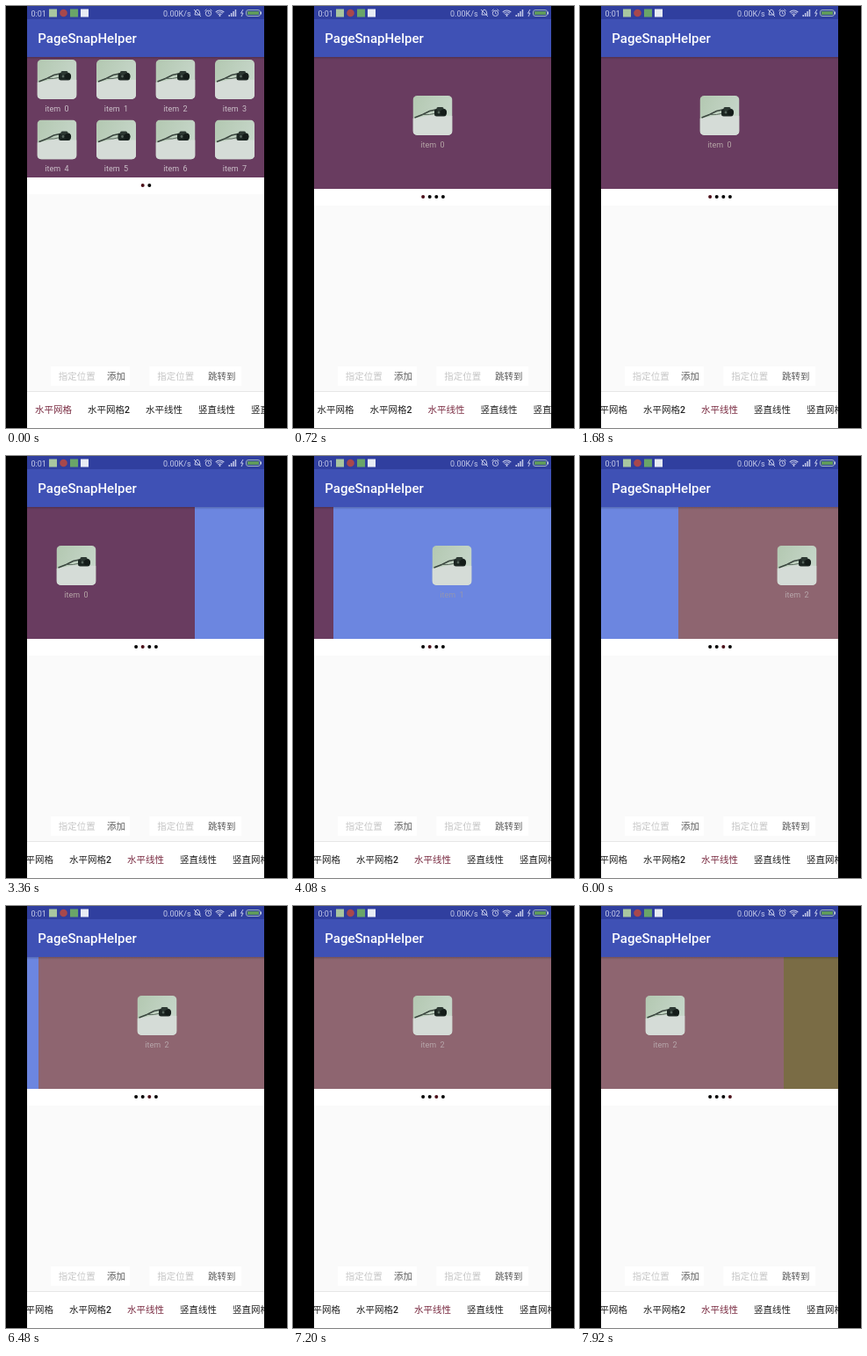
Recreate the animation shown at these times as an HTML page with a canvas. Size 320 by 480 pixels, loop 8 s.

```html
<!DOCTYPE html>
<html lang="zh">
<head>
<meta charset="utf-8">
<title>PageSnapHelper</title>
<style>
html, body { margin: 0; width: 100%; height: 100%; overflow: hidden; background: #000; }
canvas { display: block; width: 320px; height: 480px; }
</style>
</head>
<body>
<canvas id="stage"></canvas>
<script>
const LOOP = 8000, STEP = 240;
const LEFT = 24, WIDTH = 270, TOP = 58;
const SWITCH_AT = 720, CLOCK_AT = 7440;
const PAGES = ['#693c60', '#6c86e0', '#8e6570', '#7a6c45'];
const LABELS = ['#b5a5a6', '#9496b0', '#b7a6aa', '#b8b09a'];
const ACTIVE = '#7a2c42';
const SNAP = [0, 21, 100, 182, 226, 257, 266, 270];
const SWIPES = [{ at: 3360, lead: 1.74 }, { at: 5520, lead: 1 }, { at: 7920, lead: 1.52 }];
const TABS = [['水平网格', 33], ['水平网格2', 93], ['水平线性', 159], ['竖直线性', 219], ['竖直网格', 279]];
const FONT = 'Roboto, "Noto Sans CJK SC", "Noto Sans CJK", sans-serif';

const canvas = document.getElementById('stage');
const dpr = window.devicePixelRatio || 1;
canvas.width = 320 * dpr;
canvas.height = 480 * dpr;
const c = canvas.getContext('2d');
c.scale(dpr, dpr);

function rect(x, y, w, h, color) {
  c.fillStyle = color;
  c.fillRect(x, y, w, h);
}

function rounded(x, y, w, h, r, color) {
  c.fillStyle = color;
  c.beginPath();
  c.roundRect(x, y, w, h, r);
  c.fill();
}

function circle(x, y, r, color) {
  c.fillStyle = color;
  c.beginPath();
  c.arc(x, y, r, 0, Math.PI * 2);
  c.fill();
}

function line(points, color, width = 1) {
  c.strokeStyle = color;
  c.lineWidth = width;
  c.beginPath();
  points.forEach(([x, y]) => c.lineTo(x, y));
  c.stroke();
}

function text(str, x, y, size, color, weight = 400, align = 'left') {
  c.font = `${weight} ${size}px ${FONT}`;
  c.textAlign = align;
  c.fillStyle = color;
  c.fillText(str, x, y);
}

function clipped(x, y, w, h, r, draw) {
  c.save();
  c.beginPath();
  c.roundRect(x, y, w, h, r);
  c.clip();
  draw();
  c.restore();
}

// Still life: dark camera with its strap on a white table.
function photo(x, y) {
  c.save();
  c.translate(x, y);
  clipped(0, 0, 45, 45, 5, () => {
    const wall = c.createLinearGradient(0, 0, 45, 20);
    wall.addColorStop(0, '#b3c8b1');
    wall.addColorStop(1, '#c6d6c9');
    rect(0, 0, 45, 45, wall);
    c.fillStyle = '#d5dcd7';
    c.beginPath();
    c.moveTo(0, 26);
    c.lineTo(20, 22);
    c.lineTo(45, 23);
    c.lineTo(45, 45);
    c.lineTo(0, 45);
    c.fill();
    line([[2, 25], [11, 21.5], [19, 17.5], [26, 16]], '#38443d', 1.4);
    line([[11, 21.5], [19, 21.5], [26, 20]], '#55625a', 0.9);
    rounded(24.5, 15, 13.5, 8.5, 2.5, '#1c2622');
    rounded(27, 13, 8, 4, 1.5, '#2c3832');
    circle(35, 19, 3.6, '#141c19');
    circle(29.5, 19, 1.4, '#56655d');
  });
  c.restore();
}

function item(n, cx, y, color) {
  photo(cx - 22.5, y);
  text('item  ' + n, cx, y + 58.5, 9, color, 400, 'center');
}

function dots(count, active, y) {
  rect(LEFT, y - 9, WIDTH, 19, '#fff');
  for (let i = 0; i < count; i++) {
    circle(159.5 + (i - (count - 1) / 2) * 7.6, y, 2, i === active ? '#4c101a' : '#050505');
  }
}

function grid() {
  rect(LEFT, TOP, WIDTH, 137, PAGES[0]);
  for (let i = 0; i < 8; i++) {
    item(i, 58 + (i % 4) * 67.5, 61 + Math.floor(i / 4) * 68.5, '#cbbfc8');
  }
  dots(2, 0, 204);
}

function snap(u) {
  const i = Math.floor(u);
  if (i >= SNAP.length - 1) return WIDTH;
  return Math.floor(SNAP[i] + (SNAP[i + 1] - SNAP[i]) * (u - i));
}

function pager(t) {
  const begun = SWIPES.filter(s => t >= s.at);
  const offset = begun.reduce((sum, s) => sum + snap((t - s.at) / STEP + s.lead), 0);
  clipped(LEFT, TOP, WIDTH, 150, 0, () => {
    PAGES.forEach((color, i) => {
      const x = LEFT + i * WIDTH - offset;
      rect(x, TOP, WIDTH, 150, color);
      item(i, x + WIDTH / 2, 102, LABELS[i]);
    });
  });
  dots(4, begun.length, 217);
}

function statusBar(t) {
  const ink = '#c5cae9';
  rect(LEFT, 0, WIDTH, 15, '#303f9f');
  text(t >= CLOCK_AT ? '0:02' : '0:01', 28.5, 11.5, 9, ink);
  rect(49, 3.5, 9, 9, '#a9c6a0');
  circle(65.5, 8, 4.3, '#a8484c');
  rect(73, 3.5, 9, 9, '#6aa568');
  rect(85, 3.5, 9, 9, '#e8ecf4');
  text('0.00K/s', 179, 11.5, 9, ink);

  // muted bell
  line([[215, 10], [216, 5.5], [218, 4], [220, 5.5], [221, 10], [215, 10]], ink);
  line([[214, 4], [222, 12]], ink);
  // alarm
  c.beginPath();
  c.arc(230.5, 8.3, 3.2, 0, Math.PI * 2);
  c.stroke();
  line([[230.5, 6.3], [230.5, 8.5], [232, 9]], ink, 0.8);
  line([[226.5, 5.5], [228.5, 3.7]], ink);
  line([[232.5, 3.7], [234.5, 5.5]], ink);
  // wifi
  c.lineWidth = 1.1;
  for (const r of [2.5, 4.5, 6.5]) {
    c.beginPath();
    c.arc(243.5, 11.5, r, -Math.PI * 0.76, -Math.PI * 0.24);
    c.stroke();
  }
  circle(243.5, 11, 1, ink);
  // signal
  for (let i = 0; i < 4; i++) rect(253.5 + i * 2.4, 10 - i * 2, 1.5, 2 + i * 2, ink);
  // charging battery
  line([[270, 4], [267.5, 8.2], [270, 8], [268, 12]], ink);
  c.strokeStyle = '#9fb3bd';
  c.beginPath();
  c.roundRect(273.5, 4.5, 16, 7, 2.5);
  c.stroke();
  rect(275, 6, 13, 4, '#5f9a5c');
  rect(290, 6.5, 1, 3, ink);
}

function toolbar() {
  rect(LEFT, 15, WIDTH, TOP - 15, '#3f51b5');
  text('PageSnapHelper', 36.3, 42.3, 15, '#fff', 500);
  const shade = c.createLinearGradient(0, TOP, 0, TOP + 3);
  shade.addColorStop(0, 'rgba(0,0,0,.2)');
  shade.addColorStop(1, 'rgba(0,0,0,0)');
  rect(LEFT, TOP, WIDTH, 3, shade);
}

function field(x, w, action, actionX) {
  rect(x, 410, w, 22, '#fff');
  text('指定位置', x + 8.7, 425.3, 10.5, '#c6c6c6');
  text(action, actionX, 425.3, 10.5, '#5a5a5a');
}

function tabBar(t) {
  const k = Math.min(1, Math.max(0, (t - 480) / 720));
  const shift = 21 * k * k * (3 - 2 * k);
  const active = t < SWITCH_AT ? 0 : 2;
  rect(LEFT, 439, WIDTH, 41, '#fff');
  rect(LEFT, 438, WIDTH, 1, '#e6e6e6');
  clipped(LEFT, 440, WIDTH, 40, 0, () => {
    TABS.forEach(([name, x], i) => {
      text(name, x - shift, 463.3, 10.5, i === active ? ACTIVE : '#222', 500);
    });
  });
}

function render(t) {
  rect(0, 0, 320, 480, '#000');
  rect(LEFT, 0, WIDTH, 480, '#fafafa');
  if (t < SWITCH_AT) grid();
  else pager(t);
  statusBar(t);
  toolbar();
  field(51, 90, '添加', 115);
  field(163.5, 104.5, '跳转到', 230);
  tabBar(t);
}

// The picture only advances every STEP milliseconds.
const start = performance.now();
function tick() {
  const t = (performance.now() - start) % LOOP;
  render(Math.floor(t / STEP) * STEP);
  requestAnimationFrame(tick);
}
tick();
</script>
</body>
</html>
```
